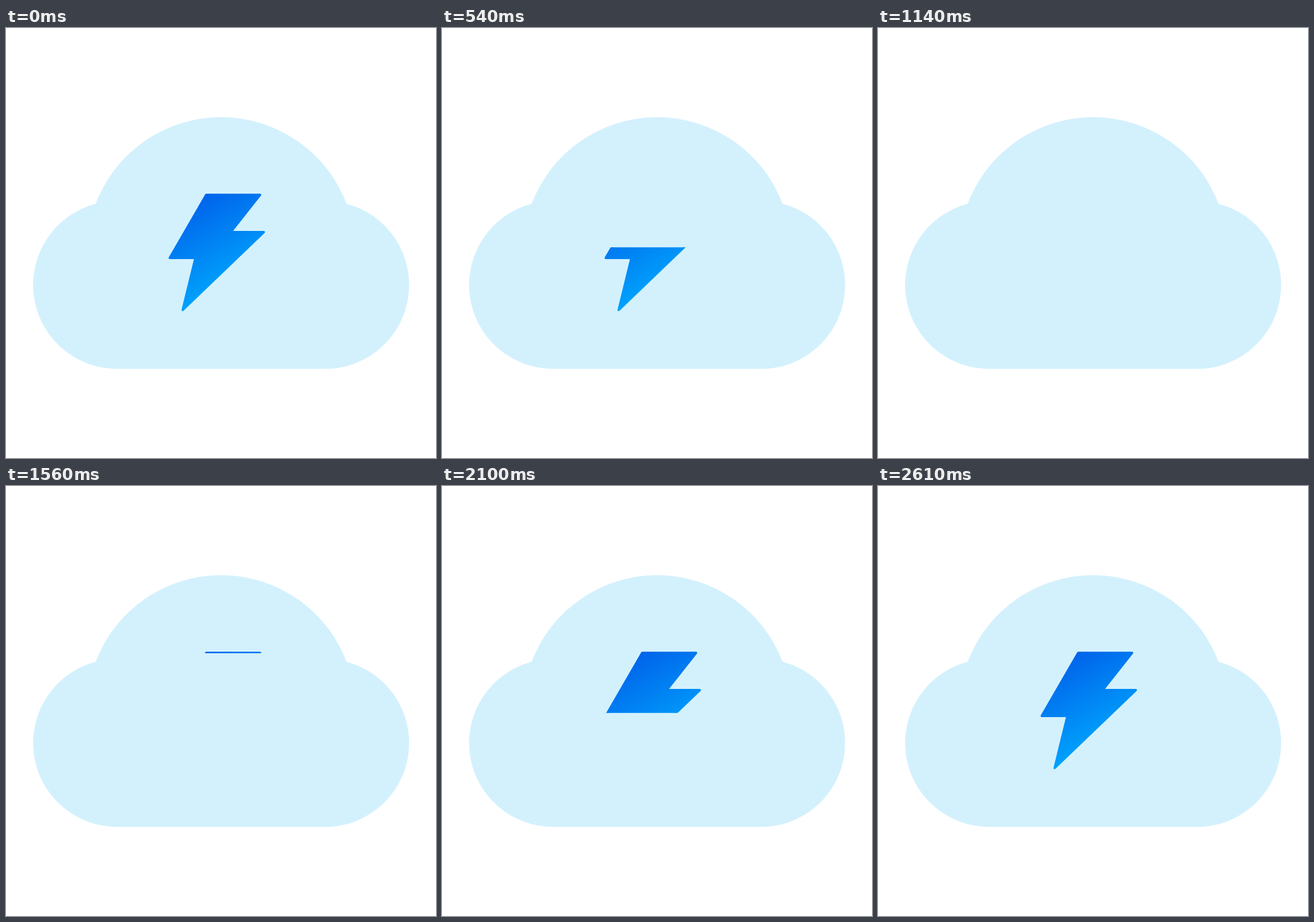
Animation, 748 px wide and 748 px high, one loop 2700 ms. Source, as an HTML page:

```html
<!DOCTYPE html>
<html lang="en">
<head>
<meta charset="utf-8">
<title>Cloud with lightning bolt</title>
<style>
  html, body {
    margin: 0;
    width: 100%;
    height: 100%;
    overflow: hidden;
    background: #fff;
  }
  svg {
    position: absolute;
    left: 0;
    top: 0;
    width: 748px;
    height: 748px;
  }
  .bolt { animation: wipe 2700ms infinite; }

  /* Erase from the top, pause, then reveal from the top, in 30 ms steps. */
  @keyframes wipe {
    0% {
      clip-path: inset(0 0 0 0);
      animation-timing-function: step-end;
    }
    1.1% {
      clip-path: inset(285.1px 0 0 0);
      animation-timing-function: steps(37, end);
    }
    42.2% {
      clip-path: inset(494.8px 0 0 0);
      animation-timing-function: step-end;
    }
    56.65% {
      clip-path: inset(0 0 463px 0);
      animation-timing-function: steps(36, end);
    }
    96.65% {
      clip-path: inset(0 0 255px 0);
      animation-timing-function: step-end;
    }
    100% { clip-path: inset(0 0 0 0); }
  }
</style>
</head>
<body>
<svg viewBox="0 0 748 748">
  <path fill="#d3f1fd" d="M193 593A146 146 0 0 1 156 305.8A233.3 233.3 0 0 1 592.4 305.8A146 146 0 0 1 555 593Z"/>
</svg>
<svg class="bolt" viewBox="0 0 748 748">
  <defs>
    <linearGradient id="blue" gradientUnits="userSpaceOnUse" x1="320" y1="300" x2="400" y2="440">
      <stop offset="0" stop-color="#0062ea"/>
      <stop offset="1" stop-color="#00a2fc"/>
    </linearGradient>
  </defs>
  <path fill="url(#blue)" stroke="url(#blue)" stroke-width="4" stroke-linejoin="round"
        d="M348.3 290.3H442L390.9 355H448.5L307.3 490.5L329.5 400H284.8Z"/>
</svg>
</body>
</html>
```
